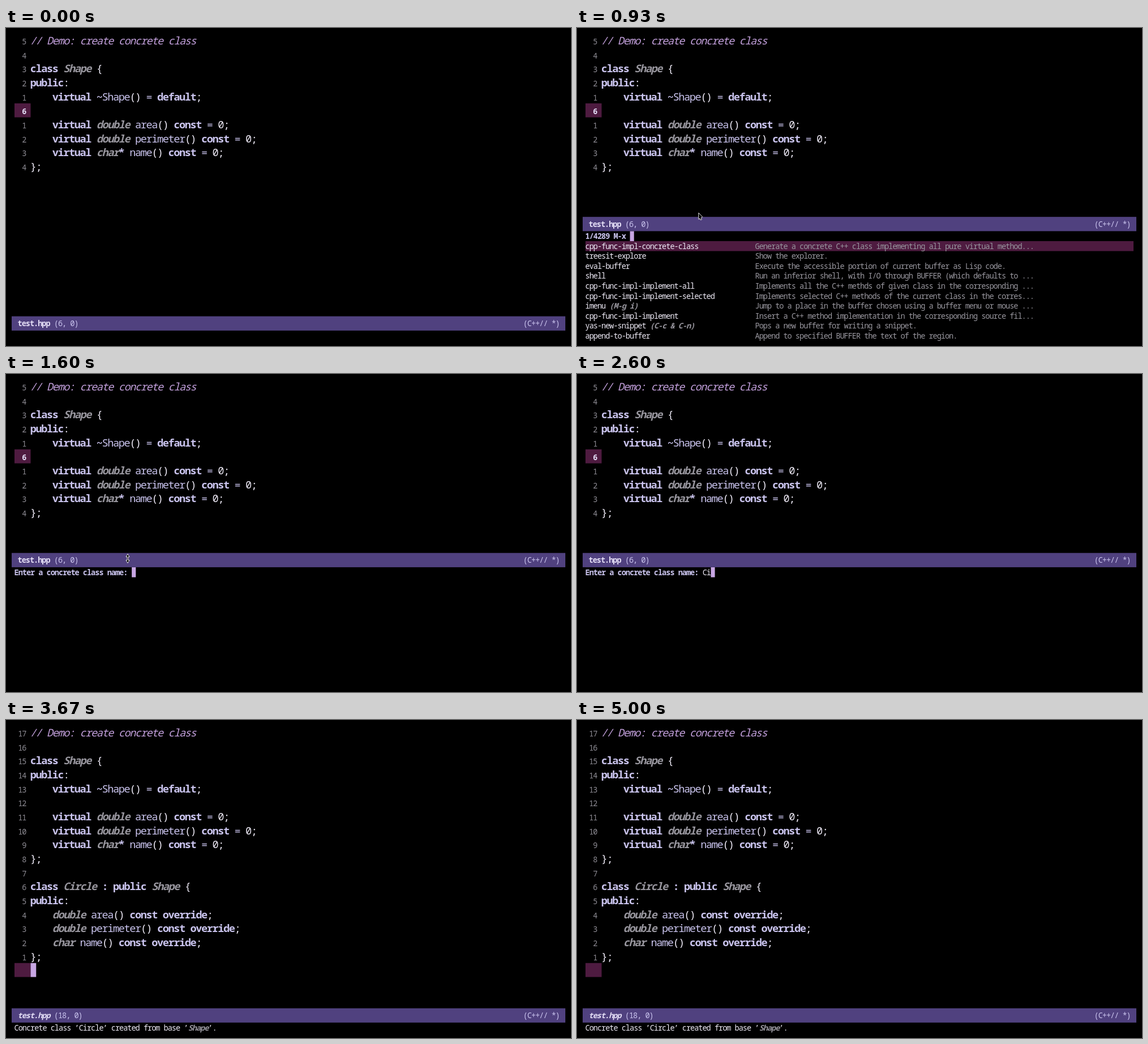
Recreate the animation shown at these times as an HTML page with a canvas. Size 998 by 561 pixels, loop 5670 ms.

```html
<!DOCTYPE html>
<html lang="en">
<head>
<meta charset="utf-8">
<title>Create concrete class</title>
<style>
html, body { margin: 0; width: 100%; height: 100%; overflow: hidden; background: #000; }
canvas { display: block; }
</style>
</head>
<body>
<canvas id="stage" width="998" height="561"></canvas>
<script>
const ctx = document.getElementById('stage').getContext('2d');
const LOOP = 5670;
const FAMILY = '"Noto Sans Mono", "DejaVu Sans Mono", monospace';
const CODE = 9.75, SMALL = 7.143;      // character pitch
const TOP = 9.7, ROW = 24.65, LEFT = 43.5;
const MINI_ROW = 17.56;

const WHITE = '#eeeaf6', LAVENDER = '#cac4ee', GRAY = '#98969e';
const PLUM = '#4e1b40', BAR = '#50417f', CURSOR = '#c8a6e4';

const STYLES = {
  keyword: ['600', LAVENDER],
  type: ['italic 600', GRAY],
  name: ['', LAVENDER],
  plain: ['', WHITE],
  strong: ['600', '#e4def6'],
  slanted: ['italic 600', '#e4def6'],
  comment: ['italic', '#c3a0dc'],
  note: ['', GRAY],
  number: ['', '#8e8c94']
};

const SHAPE = [
  '// Demo: create concrete class',
  '',
  'class Shape {',
  'public:',
  '    virtual ~Shape() = default;',
  '',
  '    virtual double area() const = 0;',
  '    virtual double perimeter() const = 0;',
  '    virtual char* name() const = 0;',
  '};'
];
const CIRCLE = [
  '',
  'class Circle : public Shape {',
  'public:',
  '    double area() const override;',
  '    double perimeter() const override;',
  '    char name() const override;',
  '};'
];

const COMMANDS = [
  ['cpp-func-impl-concrete-class', '', 'Generate a concrete C++ class implementing all pure virtual method...'],
  ['treesit-explore', '', 'Show the explorer.'],
  ['eval-buffer', '', 'Execute the accessible portion of current buffer as Lisp code.'],
  ['shell', '', 'Run an inferior shell, with I/O through BUFFER (which defaults to ...'],
  ['cpp-func-impl-implement-all', '', 'Implements all the C++ methds of given class in the corresponding ...'],
  ['cpp-func-impl-implement-selected', '', 'Implements selected C++ methods of the current class in the corres...'],
  ['imenu', '(M-g i)', 'Jump to a place in the buffer chosen using a buffer menu or mouse ...'],
  ['cpp-func-impl-implement', '', 'Insert a C++ method implementation in the corresponding source fil...'],
  ['yas-new-snippet', '(C-c & C-n)', 'Pops a new buffer for writing a snippet.'],
  ['append-to-buffer', '', 'Append to specified BUFFER the text of the region.']
];

const TOKENS = /(?<keyword>\b(?:class|public|virtual|default|const|override)\b|[~*]| : )|(?<type>\b(?:double|char|Shape|Circle)\b(?!\())|(?<name>[A-Za-z]\w*|=)|(?<plain>[^\sA-Za-z=~*]+)/g;

const KEYS = [2470, 2600, 2730, 2870, 3000, 3070];

// Type metrics for a pitch: as tall as the pitch allows without crowding.
const metrics = {};
function metric(pitch, slant) {
  const key = pitch + slant;
  if (!metrics[key]) {
    ctx.letterSpacing = '0px';
    ctx.font = `${slant} 100px ${FAMILY}`;
    const em = ctx.measureText('0').width / 100;
    const size = Math.min(pitch * 2, pitch * 1.14 / em);
    metrics[key] = { font: `${slant} ${size}px ${FAMILY}`, gap: pitch - size * em };
  }
  return metrics[key];
}

// Writes text on the character grid and returns the x after it.
function write(text, x, y, style, pitch = SMALL) {
  const [slant, color] = STYLES[style];
  const { font, gap } = metric(pitch, slant);
  ctx.font = font;
  ctx.letterSpacing = gap + 'px';
  ctx.fillStyle = color;
  ctx.fillText(text, x + gap / 2, y);
  return x + text.length * pitch;
}

function box(x, y, w, h, color) {
  ctx.fillStyle = color;
  ctx.fillRect(x, y, w, h);
}

function codeLine(text, row) {
  const y = TOP + row * ROW + 19.4;
  if (text.startsWith('//')) {
    write(text, LEFT, y, 'comment', CODE);
    return;
  }
  for (const m of text.matchAll(TOKENS)) {
    const style = Object.keys(m.groups).find(k => m.groups[k]);
    write(m[0], LEFT + m.index * CODE, y, style, CODE);
  }
}

function buffer(lines, current, lineNumber, cursorOn) {
  const top = TOP + current * ROW;
  box(15, top, LEFT - 15, ROW, PLUM);
  if (cursorOn) box(LEFT, top, CODE, ROW, CURSOR);
  for (let i = 0; i <= Math.max(current, lines.length - 1); i++) {
    const label = i === current ? lineNumber : String(Math.abs(i - current));
    write(label, 36 - label.length * SMALL, TOP + i * ROW + 19.4, i === current ? 'strong' : 'number');
    if (lines[i]) codeLine(lines[i], i);
  }
}

function modeline(y, position, nameStyle = 'strong') {
  box(10, y, 978, 25.2, BAR);
  const x = write('test.hpp', 21, y + 17.4, nameStyle);
  write(position, x + SMALL, y + 17.4, 'name');
  write('(C++// *)', 914, y + 17.4, 'name');
}

function commandList() {
  modeline(333.2, '(6, 0)');
  const x = write('1/4289 M-x ', 15, 372, 'keyword');
  box(x, 358.5, SMALL, MINI_ROW, CURSOR);
  box(15, 376, 968, MINI_ROW, PLUM);
  COMMANDS.forEach(([name, keys, note], i) => {
    const y = 389.8 + i * MINI_ROW;
    const end = write(name, 15, y, 'plain');
    if (keys) write(keys, end + SMALL, y, 'type');
    write(note, 315, y, 'note');
  });
}

function namePrompt(t) {
  modeline(315.7, '(6, 0)');
  const typed = 'Circle'.slice(0, KEYS.filter(k => t >= k).length);
  let x = write('Enter a concrete class name: ', 15, 354.8, 'keyword');
  x = write(typed, x, 354.8, 'plain');
  box(x, 341, SMALL, MINI_ROW, CURSOR);
}

function message() {
  modeline(508.6, '(18, 0)', 'slanted');
  let x = write('Concrete class ’Circle’ created from base ’', 15, 547.8, 'plain');
  x = write('Shape', x, 547.8, 'type');
  write('’.', x, 547.8, 'plain');
}

function outline(points, x, y) {
  ctx.beginPath();
  points.forEach(([px, py]) => ctx.lineTo(x + px, y + py));
  ctx.closePath();
  ctx.fillStyle = '#000';
  ctx.fill();
  ctx.strokeStyle = '#e6e6e6';
  ctx.lineWidth = 1;
  ctx.stroke();
}

function pointer(t) {
  if (t < 70 || t >= 2470) return;
  if (t >= 1470) {
    outline([[0, 0], [3, 5], [1, 5], [1, 11], [3, 11], [0, 16], [-3, 11], [-1, 11], [-1, 5], [-3, 5]], 215, 317.5);
    return;
  }
  const p = Math.min(1, (t - 70) / 400);
  const away = 8 * (1 - p) * (1 - p);
  outline([[0, 0], [7, 7.5], [4.5, 8.5], [5.5, 12], [3.2, 12.6], [2.2, 9.8], [0, 11.5]], 214.8 + away, 326 + away);
}

function draw(t) {
  box(0, 0, 998, 561, '#000');
  if (t < 3470) buffer(SHAPE, 5, '6', t >= 800 && t < 930);
  else buffer(SHAPE.concat(CIRCLE), 17, '', t < 4800);

  if (t < 930) modeline(508.6, '(6, 0)');
  else if (t < 1470) commandList();
  else if (t < 3470) namePrompt(t);
  else message();

  pointer(t);
}

const start = performance.now();
function tick() {
  draw((performance.now() - start) % LOOP);
  requestAnimationFrame(tick);
}
tick();
</script>
</body>
</html>
```
